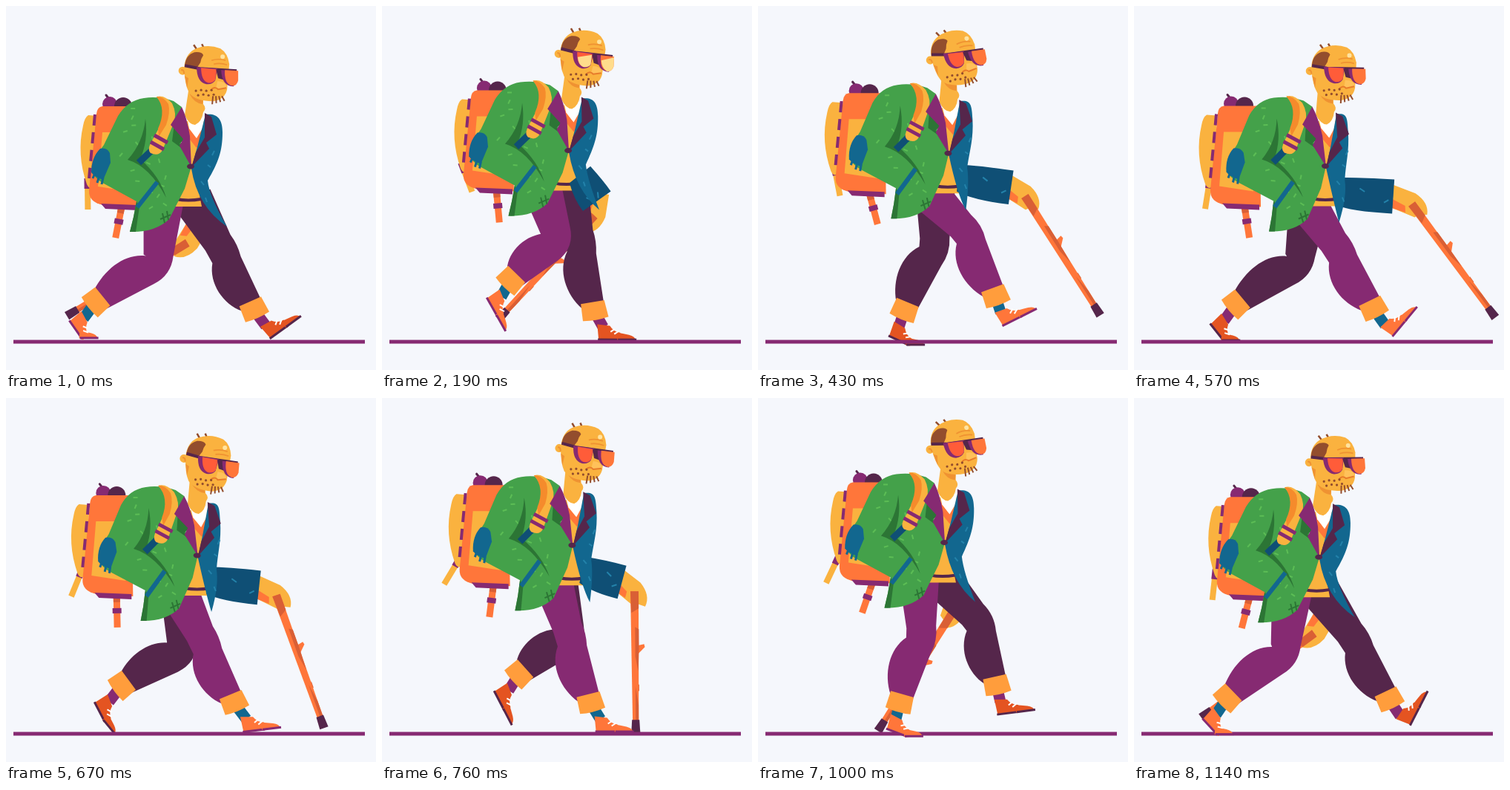
These frames come from a looping animation (499 px wide and 490 px high, 1180 ms). An HTML page with a canvas:

```html
<!DOCTYPE html>
<html lang="en">
<head>
<meta charset="utf-8">
<title>Walking traveller</title>
<style>
html, body { margin: 0; width: 100%; height: 100%; overflow: hidden; background: #f5f7fc; }
canvas { display: block; }
</style>
</head>
<body>
<canvas id="stage" width="499" height="490"></canvas>
<script>
const g = document.getElementById('stage').getContext('2d');
const LOOP = 1180, STEPS = 25, RAD = Math.PI / 180;
const SKIN = '#fab23f', AMBER = '#ff9d3c', ORANGE = '#ff763a', RUST = '#d95f35', PURPLE = '#862a72',
  PLUM = '#55264b', GREEN = '#44a14a', FOREST = '#2c7535', LIME = '#5cbd55', BLUE = '#12678f',
  NAVY = '#0f4f75', BROWN = '#934d2d', SHADE = '#ef9232';

// Cosine over the loop, peaking at step `peak`; `turns` cycles per loop
const wave = (k, peak = 0, turns = 1) => Math.cos(2 * Math.PI * turns * (k - peak) / STEPS);
// Smooth 0..1 bump, narrower with higher power
const hump = (k, peak, power) => ((1 + wave(k, peak)) / 2) ** power;

const fill = (color, d) => { g.fillStyle = color; g.fill(new Path2D(d)); };
const stroke = (color, width, d, cap = 'butt') => {
  g.strokeStyle = color; g.lineWidth = width; g.lineCap = cap; g.stroke(new Path2D(d));
};
const disc = (color, x, y, r, ry = r) => {
  g.fillStyle = color; g.beginPath(); g.ellipse(x, y, r, ry, 0, 0, 7); g.fill();
};
function group(x, y, angle, draw) {
  g.save(); g.translate(x, y); g.rotate(angle * RAD); draw(); g.restore();
}
// Point reached from (x, y) going `along` direction a, then `side` to its front
const off = (x, y, a, along, side) =>
  [x + Math.cos(a) * along + Math.sin(a) * side, y + Math.sin(a) * along - Math.cos(a) * side];

function shoe(color, sole, bend) {
  fill(color, 'M-6 19L-8 -2L9 0Q14 8 23 9L25 19Z');
  stroke(sole, 3, 'M-7 18.5H23');
  group(22, 19, bend, () => {
    fill(color, 'M-3 0L-2 -10Q4 -9 13 -7Q21 -5 22 0Z');
    stroke(sole, 3, 'M-2 -.5H23');
  });
  stroke('#fff', 2, 'M10 8L16 4M15 11L21 7');
}

function leg(hx, hy, k, shift, [cloth, sock, color, sole]) {
  const t = 2 * Math.PI * k / STEPS;
  const ax = 229 + shift - 115 * Math.cos(t) - 12 * Math.sin(2 * t) + 7 * Math.sin(3 * t) + 10 * Math.cos(4 * t - 2.8);
  const ay = 430.5 - 43 * hump(k, 5, 3);
  const foot = 64 * hump(k, 2.5, 1.5) - 80 * hump(k, 10.6, 13);
  const toe = -Math.max(foot, 0) * Math.min(1, Math.max(0, (ay - 405) / 10));
  const cx = ax + 17 * wave(k, 1), cy = ay - 20;
  const [kx, ky] = off(hx, hy, Math.atan2(cy - hy, cx - hx), .44 * Math.hypot(cx - hx, cy - hy), 46 * hump(k, 2.5, 1.5));
  const a = Math.atan2(ky - hy, kx - hx), s = Math.atan2(cy - ky, cx - kx);

  stroke(sock, 15, `M${cx} ${cy}L${ax} ${ay + 2}`);
  group(ax, ay, foot, () => shoe(color, sole, toe));
  fill(cloth, `M${off(hx, hy, a, -14, 27)}L${off(kx, ky, a, -16, 20)}Q${off(kx, ky, (a + s) / 2, 0, 22)} ` +
    `${off(kx, ky, s, 16, 18)}L${off(cx, cy, s, -6, 15)}L${off(cx, cy, s, -6, -15)}` +
    `C${off(kx, ky, s, 62, -33)} ${off(kx, ky, s, 28, -37)} ${off(kx, ky, s, 6, -20)}` +
    `L${off(kx, ky, a, -14, -20)}L${off(hx, hy, a, -14, -28)}Z`);
  group(cx, cy, .85 * (s / RAD - 90), () => fill(AMBER, 'M-16 -12L16 -12L18 11Q0 14 -17 11Z'));
}

function stick(x, y, angle) {
  const twig = 'M0 0L-8 -7L-11 -6L-9 0Z';
  group(x, y, angle, () => {
    group(0, 75, 90, () => fill(ORANGE, 'M6 -4L-3 -13L-7 -12L-5 -3Z'));
    group(5, 122, -90, () => fill(RUST, twig));
    fill(ORANGE, 'M-6 -3H5L4 182H-4Z');
    fill(RUST, 'M-6 -3H5L5 20L-5 26ZM0 45L5 48V72L4 105L0 85ZM0 125L4 150V180H0Z');
    fill(PLUM, 'M-5 170H5L6 187H-6Z');
  });
}

function backpack(k, c) {
  group(110 - 8 * c, 236, 6 - 28 * wave(k, 5.3), () => {
    stroke(SKIN, 8, 'M0 4V38');
    stroke(PURPLE, 9, 'M0 -4V10');
  });
  group(156 - 7 * c, 270, 2 + 17 * wave(k, 21), () => {
    stroke(ORANGE, 9, 'M0 0V43');
    stroke(RUST, 9, 'M0 0V9');
    stroke(PURPLE, 12, 'M0 17V24');
  });
  group(-9 * c, 0, 0, () => {
    stroke(PLUM, 3, 'M139 125L135 120', 'round');
    disc(PURPLE, 140, 132, 10);
    disc(PLUM, 158, 135, 12);
    group(-4 * c, 0, 0, () => fill(SKIN, 'M111 147L125 148L120 243Q113 249 109 240Q95 200 104 161Q106 150 111 147Z'));
    fill(ORANGE, 'M130 135H178L180 271L131 268Q111 264 112 248L122 145Q123 136 130 135Z');
    fill(SKIN, 'M130 170H172L170 250L124 243Z');
    fill(PURPLE, 'M128 266L178 268V275L134 273Z');
    g.setLineDash([15, 9]);
    stroke(PURPLE, 4, 'M120 146L112 232');
    g.setLineDash([]);
  });
}

function shirt() {
  fill(SKIN, 'M244 155H269L266 194L254 218L264 270H227L232 210Z');
  fill(ORANGE, 'M243 158L256 177L269 152L271 170L257 191L245 176Z');
  fill('#fff', 'M245 154L267 150L266 163L257 178L247 165Z');
  fill(SKIN, 'M247 108L241 147Q247 160 255 160Q264 156 266 143Q271 138 266 132V112Z');
  fill(SHADE, 'M248 111L266 125L265 132Q254 131 248 119Z');
  stroke(PLUM, 4, 'M229 260Q246 263 263 260');
}

function panel(c) {
  const x = 43 - 9 * c, waist = 23 + 2 * c;
  group(249, 216, 0, () => {
    fill(BLUE, `M20 -70C35 -72 ${x} -65 ${x} -46C${x} -20 ${x - 6} -5 ${waist} 19` +
      `Q${waist + 2} 40 ${49 - 36 * c} ${81 - 5 * c}Q9 54 1 3L10 -30Z`);
    stroke('#2382aa', 2, 'M29 -15l3 -6M14 20l4 5M20 42l2 6M23 -2l4 3');
  });
  fill(PLUM, 'M268 144L277 149L284 173L270 184L274 192L250 217L256 197L268 177Z');
}

// Short threads scattered over the jacket
let seed = 11;
const random = () => (seed = seed * 16807 % 2147483647) / 2147483647;
let threads = '';
for (let i = 0; i < 20; i++) {
  const y = 138 + 7.5 * i, turn = random() * 6;
  threads += `M${136 + .25 * (y - 138) + random() * 72} ${y}l${6 * Math.cos(turn)} ${6 * Math.sin(turn)}`;
}
const COAT = 'M237 136L226 128Q206 121 186 124Q164 127 151 148L132 187Q118 205 116 220Q118 232 132 239L176 263' +
  'L172 284L167 304Q201 305 220 287L241 246L250 216L238 190L232 172Z';

function jacket() {
  fill(GREEN, COAT);
  g.save();
  g.clip(new Path2D(COAT));
  stroke(LIME, 2, threads);
  g.restore();
  fill(FOREST, 'M188 152Q185 184 164 207Q194 216 216 258Q208 230 181 206Q192 181 188 152Z');
  fill(FOREST, 'M176 263L180 270L175 304H167L172 284Z');
  fill(FOREST, 'M227 158L241 180L234 185L239 193L224 182Z');
  stroke(FOREST, 2, 'M211 279L214 292M217 276L219 288M208 287L222 281');
  stroke(BLUE, 6, 'M177 271L204 237');
  fill(BLUE, 'M127 192Q136 190 140 198L141 211L131 234Q119 230 115 224Q115 204 127 192Z');
  stroke(BLUE, 3, 'M120 225L117 232M126 228L123 238M131 231L129 240');
  stroke(NAVY, 9, 'M198 193L179 211');
  fill(SKIN, 'M203 122Q214 119 224 131Q231 145 226 158L211 194Q206 203 195 198Q191 194 194 187L210 157Q217 139 203 122Z');
  fill('#f58b2c', 'M203 122Q212 121 219 132Q222 143 216 160L206 176L205 165Q217 139 203 122Z');
  stroke(PURPLE, 5, 'M200 174L218 184M195 183L213 193');
  fill(PURPLE, 'M237 136L229 149L222 160L239 179L234 188L250 217L248 175Q244 150 237 136Z');
  disc(PLUM, 249, 216, 5, 3.5);
}

function head(glare) {
  stroke(BROWN, 2.5, 'M258 58L254 52M268 57L265 51');
  fill(SKIN, 'M241 84Q242 65 255 58Q272 50 290 57Q300 63 302 78L299 112Q296 126 280 128Q257 128 248 117Q242 106 241 84Z');
  disc(SKIN, 239, 87, 5.5);
  stroke(SHADE, 2, 'M237 86Q241 85 241 91');
  fill(SHADE, 'M242 94L247 97L245 110Z');
  fill(BROWN, 'M242 80Q243 66 255 62Q265 61 267 66Q264 70 263 76L259 82Z');
  stroke(SHADE, 1.7, 'M278 73Q287 70 297 73M281 78Q290 76 299 79');
  disc('#ffe3a0', 293, 68, 3);
  stroke(PLUM, 4, 'M242 80L262 84L312 87');
  fill(PURPLE, 'M258 82L286 84L283 100Q279 106 271 105Q258 102 258 82Z');
  fill('#ff5c39', 'M264 83L285 85L283 99Q280 104 273 103Q264 100 264 83Z');
  fill(PLUM, 'M284 85L296 86L294 99L287 97Z');
  fill(PURPLE, 'M291 86L310 87L308 108Q292 108 291 86Z');
  fill(ORANGE, 'M296 86L314 87V100Q312 108 305 107Q295 104 296 86Z');
  g.globalAlpha = glare;
  fill('#ffdc8c', 'M265 90L284 86L283 99Q280 104 273 103Q266 100 265 90ZM297 93L314 88V100Q312 108 305 107Q298 103 297 93Z');
  g.globalAlpha = 1;
  fill('#ffc15a', 'M286 101Q298 101 299 110L284 112Z');
  stroke('#e77c2b', 2, 'M277 113Q282 107 287 112L298 110');
  for (let i = 0; i < 8; i++) disc(BROWN, 257 + 7 * (i % 4) + 3 * (i > 3), 114 + 6 * (i > 3) - i % 2, 1.6);
  for (let i = 0; i < 4; i++) stroke(BROWN, 2, `M${280 + 4 * i} 121L${279 + 5.5 * i} ${132 - 1.5 * i}`);
}

function draw(k) {
  const swing = wave(k), c = (1 - swing) / 2;
  const by = 15 * wave(k, 0, 2) - 15;
  const wx = 304 + 46 * wave(k, 11.5), wy = 276 + by - 19 * wave(k, 12);
  const gx = 309 + 68 * wave(k, 11.7), gy = 295 + by - 26 * wave(k, 12);

  // The torso leans: the lower it is, the more it sways
  const torso = part => {
    g.save();
    g.transform(1, 0, .07 * c, 1, 9 * c - .07 * c * 216, by);
    part();
    g.restore();
  };

  g.fillStyle = '#f5f7fc';
  g.fillRect(0, 0, 499, 490);

  // Far hand and walking stick
  const a = Math.atan2(gy - wy, gx - wx);
  fill(SKIN, `M${off(wx, wy, a, -12, 14)}L${off(gx, gy, a, -4, 16)}Q${off(gx, gy, a, 18, 12)} ` +
    `${off(gx, gy, a, 22, -4)}L${off(gx, gy, a, 12, -8)}L${off(gx, gy, a, 8, -14)}L${off(wx, wy, a, -12, -15)}Z`);
  fill(ORANGE, `M${off(wx, wy, a, -8, -3)}L${off(gx, gy, a, -10, -5)}L${off(gx, gy, a, -6, -13)}L${off(wx, wy, a, -8, -16)}Z`);
  stick(gx, gy, 13 + 46 * swing - 6 * wave(k, 6.25) + 11.5 * wave(k, 3.125, 2));

  leg(247 + 12 * swing, 272 + by, (k + STEPS / 2) % STEPS, 16, [PLUM, PURPLE, '#e45421', PLUM]);
  g.fillStyle = PURPLE;
  g.fillRect(10, 449.5, 474, 5);
  leg(225 - 13 * swing, 272 + by, k, 0, [PURPLE, BLUE, ORANGE, PURPLE]);

  group(0, by, 0, () => backpack(k, c));
  torso(shirt);
  if (wx > 280) {
    const ex = 265 + 9 * c, ey = 252 + by, s = Math.atan2(wy - ey, wx - ex);
    fill(NAVY, `M${off(ex, ey, s, -4, 20)}Q${off(ex, ey, s, 22, 23)} ${off(wx, wy, s, 0, 23)}` +
      `L${off(wx, wy, s, 0, -23)}Q${off(ex, ey, s, 20, -24)} ${off(ex, ey, s, -2, -16)}Z`);
    stroke('#2382aa', 2, `M${off(ex, ey, s, 30, 8)}L${off(ex, ey, s, 37, 4)}M${off(wx, wy, s, -12, -9)}L${off(wx, wy, s, -6, -5)}`);
  }
  torso(() => panel(c));
  torso(jacket);
  group(235 + 4 * wave(k, 2, 2), 73 + 14.5 * wave(k, -.4, 2), 8.5 * wave(k, 2.4, 2) - 3, () => {
    g.translate(-238, -87);
    head(Math.max(0, 1 - Math.abs(k - 4) / 2.5));
  });
}

const start = performance.now();
function tick() {
  const t = (performance.now() - start) % LOOP;
  draw(Math.floor(t * STEPS / LOOP));
  requestAnimationFrame(tick);
}
tick();
</script>
</body>
</html>
```
